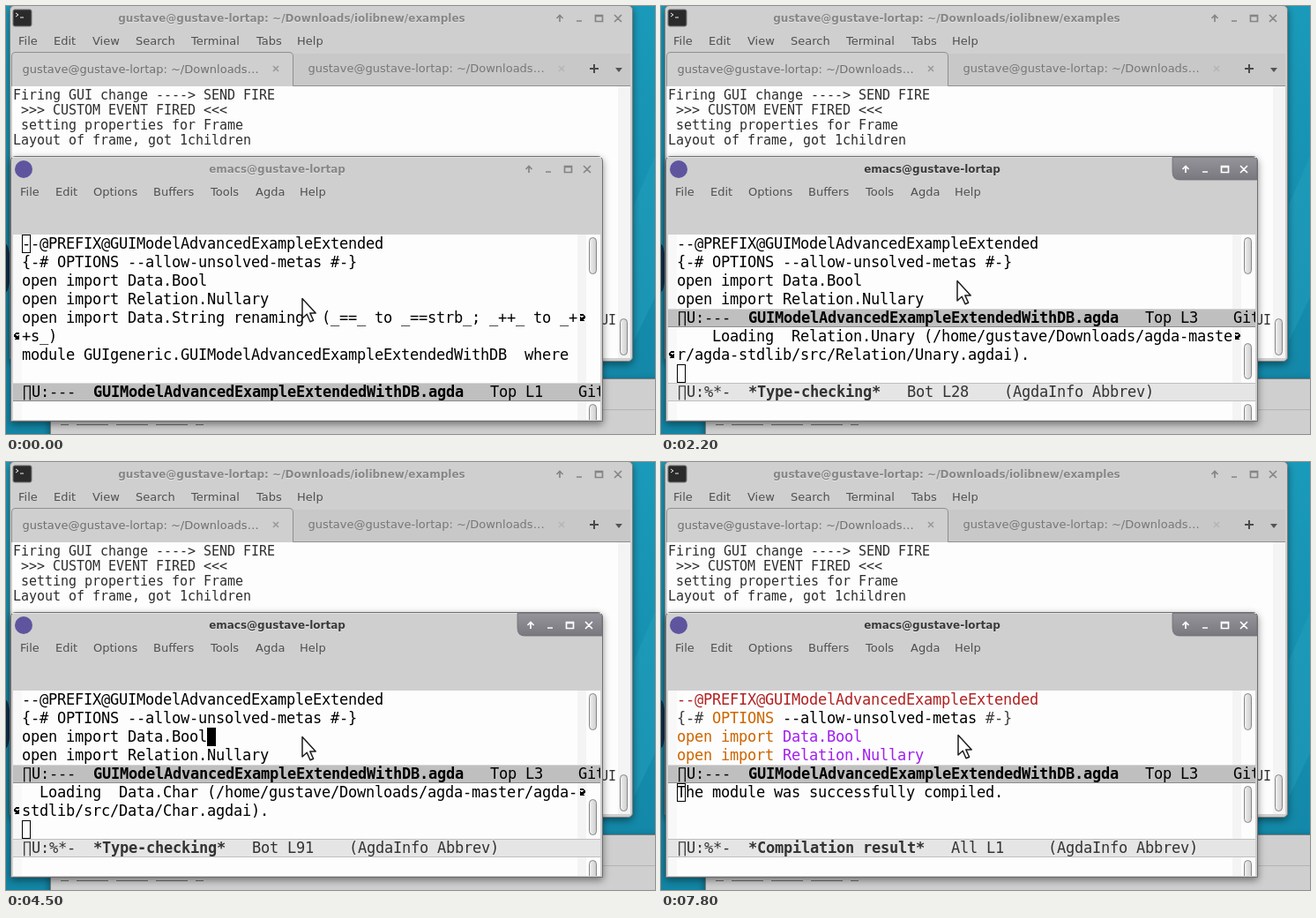
Recreate the animation shown at these times as an HTML page. Size 736 by 485 pixels, loop 8 s.

```html
<!DOCTYPE html>
<html lang="en">
<head>
<meta charset="utf-8">
<title>Compiling an Agda module</title>
<style>
html, body { margin: 0; width: 100%; height: 100%; overflow: hidden; background: #1489a9; }
svg { display: block; width: 736px; height: 485px; }
text { white-space: pre; }
.ui { font: 13px "DejaVu Sans", sans-serif; fill: #505050; }
.title { font: bold 12px "DejaVu Sans", sans-serif; text-anchor: middle; }
.code { font: 17px "DejaVu Sans Mono", monospace; letter-spacing: var(--code-gap, 0); }
.term { font: 15px "DejaVu Sans Mono", monospace; letter-spacing: var(--term-gap, 0); fill: #2e2e2e; }
.b { font-weight: bold; }
.comment { fill: #b22222; }
.keyword { fill: #cd6600; }
.module { fill: #a020f0; }
.symbol { fill: #404040; }
</style>
</head>
<body>
<svg id="stage" viewBox="0 0 736 485" xmlns="http://www.w3.org/2000/svg"></svg>
<script>
const LOOP = 8000;
const COLS = 63;
const HOME = '/home/gustave/Downloads/';
const HOST = 'gustave@gustave-lortap';
const stage = document.getElementById('stage');

const rect = (x, y, w, h, fill, extra = '') =>
  `<rect x="${x}" y="${y}" width="${w}" height="${h}" fill="${fill}" ${extra}/>`;
const text = (cls, x, y, s, extra = '') => `<text class="${cls}" x="${x}" y="${y}" ${extra}>${s}</text>`;
const path = (d, extra) => `<path d="${d}" ${extra}/>`;
const span = (cls, s) => `<tspan class="${cls}">${s}</tspan>`;
const thumb = (x, y, h) => rect(x + .5, y + .5, 8, h - 1, 'url(#thumb)', 'rx="4" stroke="#868686"');
const menu = (y, items) => items.map(([s, x]) => text('ui', x, y, s)).join('');
const cross = (x, y, r) => `M${x - r} ${y - r}l${2 * r} ${2 * r}M${x - r} ${y + r}l${2 * r} ${-2 * r}`;
const titleText = (x, y, s, fill) =>
  text('title', x, y + 1, s, 'fill="#e6e6e6"') + text('title', x, y, s, `fill="${fill}"`);

// Window buttons: shade, minimise, maximise, close
const buttons = (x, y, color) =>
  path(`M${x} ${y + 4}v-7M${x - 3.5} ${y}l3.5 -3.5l3.5 3.5M${x + 19} ${y + 3}h6` +
    `M${x + 40.5} ${y - 3.5}h8v7h-8zM${x + 40.5} ${y - 2.5}h8` + cross(x + 66, y, 4),
    `fill="none" stroke="${color}" stroke-width="1.7"`);

// Continuation arrows in the fringes
const HOOK = 'M2 0H6V2H2V3H3V4H5V3H6V8H1V7H2V6H1V5H0V2H1V1H2Z';
const hookLeft = top => path(HOOK, `transform="translate(9 ${top + 6})"`);
const hookRight = top => path(HOOK, `transform="translate(657 ${top + 6}) scale(-1 1)"`);

const rowTop = i => 259 + 21 * i;
const codeRow = (i, s) => text('code', 18, rowTop(i) + 16, s);
const hollow = row => rect(18.5, rowTop(row) + .5, 9, 20, 'none', 'stroke="#000"');

function modeLine(row, active, flags, name, rest) {
  const y = rowTop(row);
  const [fill, edge, ink] = active ? ['#bfbfbf', '#8c8c8c', '#000'] : ['#e5e5e5', '#bfbfbf', '#333'];
  return rect(8, y, 666, 21, fill) + rect(8, y, 666, 1, active ? '#d9d9d9' : edge) +
    rect(8, y + 20, 666, 1, edge) +
    text('code', 19, y + 16, `∏U:${flags}  ${span('b', name)}   ${rest}`, `fill="${ink}"`);
}

const plainLines = [
  '--@PREFIX@GUIModelAdvancedExampleExtended',
  '{-# OPTIONS --allow-unsolved-metas #-}',
  'open import Data.Bool',
  'open import Relation.Nullary',
  'open import Data.String renaming  (_==_ to _==strb_; _++_ to _+',
  '+s_)',
  'module GUIgeneric.GUIModelAdvancedExampleExtendedWithDB  where'
];
const imported = s => span('keyword', 'open import') + span('module', ' ' + s);
const colourLines = [
  span('comment', plainLines[0]),
  span('symbol', '{-# ') + span('keyword', 'OPTIONS') + ' --allow-unsolved-metas' + span('symbol', ' #-}'),
  imported('Data.Bool'),
  imported('Relation.Nullary')
];

// Loading log: time, line number, indent, module
const log = [
  [1700, 8, 3, 'Data.Bool.Base'],
  [1800, 13, 4, 'Relation.Nullary'],
  [1900, 18, 5, 'Data.Empty'],
  [2100, 25, 6, 'Relation.Binary.PropositionalEquality'],
  [2200, 28, 4, 'Relation.Unary'],
  [2300, 31, 5, 'Relation.Binary.Core'],
  [2400, 35, 6, 'Relation.Binary.Consequences'],
  [2700, 40, 5, 'Data.Product'],
  [2800, 43, 6, 'Relation.Binary.Indexed.Core'],
  [3100, 47, 7, 'Data.Sum'],
  [3300, 50, 6, 'Data.Maybe.Base'],
  [3400, 53, 7, 'Data.Nat.Base'],
  [3500, 55, 8, 'Data.List.Base'],
  [3600, 58, 9, 'Category.Functor'],
  [3700, 61, 8, 'Category.Monad'],
  [3800, 64, 7, 'Data.Fin'],
  [3900, 68, 6, 'Data.Vec'],
  [4300, 82, 4, 'Algebra.Structures'],
  [4400, 87, 3, 'Data.Nat.Properties'],
  [4500, 91, 2, 'Data.Char'],
  [4600, 95, 3, 'Data.String.Base'],
  [4700, 99, 2, 'Data.String'],
  [4800, 104, 3, 'Data.List'],
  [4900, 108, 4, 'Data.Colist'],
  [5000, 113, 3, 'IO.Primitive'],
  [5100, 118, 2, 'Data.Unit'],
  [5200, 125, 3, 'Data.Integer'],
  [5300, 132, 4, 'Data.Sign'],
  [5400, 139, 2, 'Data.Rational'],
  [6000, 142, 2, 'GUIgeneric.GUIModel'],
  [6100, 143, 1, 'GUIgeneric.GUIModelAdvancedWithDB']
];

function logRows([, , indent, name]) {
  const root = name.startsWith('GUI') ? 'iolibnew/examples/' : 'agda-master/agda-stdlib/src/';
  const s = `${' '.repeat(indent)}Loading  ${name} (${HOME}${root}${name.replaceAll('.', '/')}.agdai).`;
  const parts = s.match(new RegExp(`.{1,${COLS}}`, 'g'));
  return parts.map((part, i) => ({ part, left: i > 0, right: i < parts.length - 1 })).slice(-2);
}

function lowerPane(t) {
  const mode = (name, pos, line) =>
    modeLine(8, false, '%*-', name, `${pos} ${('L' + line).padEnd(7)}(AgdaInfo Abbrev)`);
  if (t >= 7100)
    return codeRow(5, 'The module was successfully compiled.') + hollow(5) + thumb(661, 367, 42) +
      mode('*Compilation result*', 'All', 1);
  const entry = log.findLast(e => e[0] <= t);
  if (!entry) return hollow(5) + thumb(661, 367, 42) + mode('*Type-checking*', 'All', 1);
  const rows = logRows(entry).map((r, i) => codeRow(5 + i, r.part) +
    (r.left ? hookLeft(rowTop(5 + i)) : '') + (r.right ? hookRight(rowTop(5 + i)) : ''));
  return rows.join('') + hollow(7) + thumb(661, 382, 41) + mode('*Type-checking*', 'Bot', entry[1]);
}

function pointer(t) {
  if (t < 100) return '';
  if (t < 300) return rect(18, 259, 10, 21, '#000') + text('code', 18, 275, '-', 'fill="#fff"');
  const on = t < 1300 ? t < 900 : Math.floor((t - 1300) / 500) % 2 === 0;
  return on ? rect(228, 301, 10, 21, '#000') : '';
}

function editor(t) {
  const split = t >= 1400;
  const lines = t >= 6200 ? colourLines : plainLines.slice(0, split ? 4 : 7);
  const top = modeLine(split ? 4 : 8, true, '---', 'GUIModelAdvancedExampleExtendedWithDB.agda',
    `Top L${t < 400 ? 1 : 3}    Git`);
  return lines.map((s, i) => codeRow(i, s)).join('') + thumb(661, 262, 42) + top +
    (split ? lowerPane(t) : hookRight(rowTop(4)) + hookLeft(rowTop(5))) +
    (t < 100 ? hollow(0) : '') + pointer(t) +
    (t >= 1300 && t < 1400 ? codeRow(9, '(No changes need to be saved)') : '') +
    thumb(661, 451, 30);
}

function frameTitle(focused) {
  const panel = path('M580 171.5H671Q676 171.5 676 177V197H588Q580 197 580 188Z',
    'fill="url(#panel)" stroke="#6f6f74" stroke-width=".8"');
  return titleText(307.5, 189, 'emacs@gustave-lortap', focused ? '#3a3a3a' : '#868686') +
    (focused ? panel + buttons(595, 185, '#fff') : buttons(593, 185, '#858585'));
}

const gradient = (id, a, b) => `<linearGradient id="${id}" x2="0" y2="1">
  <stop stop-color="${a}"/><stop offset="1" stop-color="${b}"/></linearGradient>`;

function desktop() {
  return rect(0, 0, 736, 485, 'url(#sky)') +
    path('M712 225L736 170V330L712 380Z', 'fill="#2aa5c4" opacity=".35"') +
    '<ellipse cx="0" cy="297" rx="5" ry="27" fill="#0d3352"/>' +
    `<g filter="url(#shadow)">${rect(50.5, 422.5, 700, 80, '#cfcfcf', 'stroke="#7d7d7d"')}</g>` +
    rect(51, 457, 690, 1, '#b4b4b4') +
    text('term', 62, 471, '_ ____ ____ ____ _');
}

function terminal() {
  const tab = `${HOST}: ~/Downloads…`;
  const output = ['Firing GUI change ----&gt; SEND FIRE', ' &gt;&gt;&gt; CUSTOM EVENT FIRED &lt;&lt;&lt;',
    ' setting properties for Frame', 'Layout of frame, got 1children'];
  const closes = path(cross(306, 71, 3), 'stroke="#999" stroke-width="1.6"') +
    path(cross(630, 71, 3), 'stroke="#b5b5b5" stroke-width="1.6"');
  return `<g filter="url(#shadow)">${rect(4.5, -.5, 706, 403, '#cfcfcf', 'rx="5" stroke="#7d7d7d"')}</g>` +
    rect(8, 4, 21, 19, '#2a2a2a', 'rx="2" stroke="#777"') +
    path('M11 8l3 2l-3 2M16 13h4', 'fill="none" stroke="#eee"') +
    titleText(324, 18, `${HOST}: ~/Downloads/iolibnew/examples`, '#868686') +
    buttons(628, 14, '#858585') +
    menu(44, [['File', 14], ['Edit', 54], ['View', 98], ['Search', 147], ['Terminal', 210], ['Tabs', 284], ['Help', 330]]) +
    rect(326, 54, 382, 37, '#c8c8c8') +
    path('M6.5 91V57Q6.5 52.5 11 52.5H321Q325.5 52.5 325.5 57V90.5H708', 'fill="none" stroke="#8f8f8f"') +
    text('ui', 18.5, 76, tab, 'style="fill:#707070"') + text('ui', 342.5, 75, tab, 'style="fill:#777"') + closes +
    path('M662 71h10M667 66v10', 'stroke="#4a4a4a" stroke-width="2"') +
    path('M691 70h8l-4 5z', 'fill="#555"') +
    rect(7, 91, 701, 308, '#fdfdfd') + rect(694, 91, 14, 308, '#f4f4f4') + thumb(696, 354, 42) +
    output.map((s, i) => text('term', 8, 106 + 17 * i, s)).join('') +
    text('term', 674, 361, 'UI');
}

function emacsFrame() {
  return `<g filter="url(#shadow)">${path('M5.5 470.5V176Q5.5 170.5 11 170.5H671Q676.5 170.5 676.5 176V470.5Z',
    'fill="#cfcfcf" stroke="#6e6e6e"')}</g>` +
    rect(7, 171, 668, 1, '#e4e4e4') +
    '<circle cx="20" cy="185" r="10" fill="#5f559f"/>' +
    menu(215, [['File', 16], ['Edit', 56], ['Options', 99], ['Buffers', 167], ['Tools', 232], ['Agda', 283], ['Help', 333]]) +
    rect(8, 259, 666, 210, '#fdfdfd') + rect(8, 259, 10, 210, '#f8f8f8') + rect(648, 259, 10, 210, '#f4f4f4');
}

stage.innerHTML = `<defs>
  ${gradient('sky', '#1a9aba', '#1285a5')}${gradient('panel', '#94949a', '#78787e')}
  <linearGradient id="thumb"><stop stop-color="#f2f2f2"/><stop offset="1" stop-color="#cccccc"/></linearGradient>
  <filter id="shadow" x="-10%" y="-10%" width="120%" height="120%">
    <feDropShadow dx="0" dy="3" stdDeviation="4" flood-opacity=".45"/></filter>
  <clipPath id="inner"><rect x="8" y="259" width="666" height="210"/></clipPath>
  </defs>${desktop()}${terminal()}${emacsFrame()}
  <g id="title"></g><g id="editor" clip-path="url(#inner)"></g>
  <path id="mouse" d="M0 0V22.5L5.2 17.8L9 26.3L12.6 24.7L8.8 16.4H15.2Z"
    fill="#fff" stroke="#1c1c1c" stroke-width="1.5" stroke-linejoin="round"/>`;

// Keep monospace text on whole-pixel cells
function setCell(cls, width) {
  const probe = document.createElementNS('http://www.w3.org/2000/svg', 'text');
  probe.setAttribute('class', cls);
  probe.textContent = 'm'.repeat(50);
  stage.append(probe);
  stage.style.setProperty(`--${cls}-gap`, `${width - probe.getComputedTextLength() / 50}px`);
  probe.remove();
}
setCell('code', 10);
setCell('term', 9);

const parts = Object.fromEntries(['title', 'editor', 'mouse'].map(id => [id, document.getElementById(id)]));

function mousePlace(t) {
  if (t < 100) return [336, 331.5];
  if (t < 200) return [336, 320];
  if (t < 7700) return [336, 311.5];
  return t < 7800 ? [336.5, 310.5] : [337, 309.5];
}

let shown = -1;
function render(time) {
  const t = Math.floor((time % LOOP) / 100) * 100;
  if (t === shown) return;
  shown = t;
  parts.title.innerHTML = frameTitle(t >= 100);
  parts.editor.innerHTML = editor(t);
  parts.mouse.setAttribute('transform', `translate(${mousePlace(t)})`);
}

const start = performance.now();
function tick() {
  render(performance.now() - start);
  requestAnimationFrame(tick);
}
tick();
</script>
</body>
</html>
```
